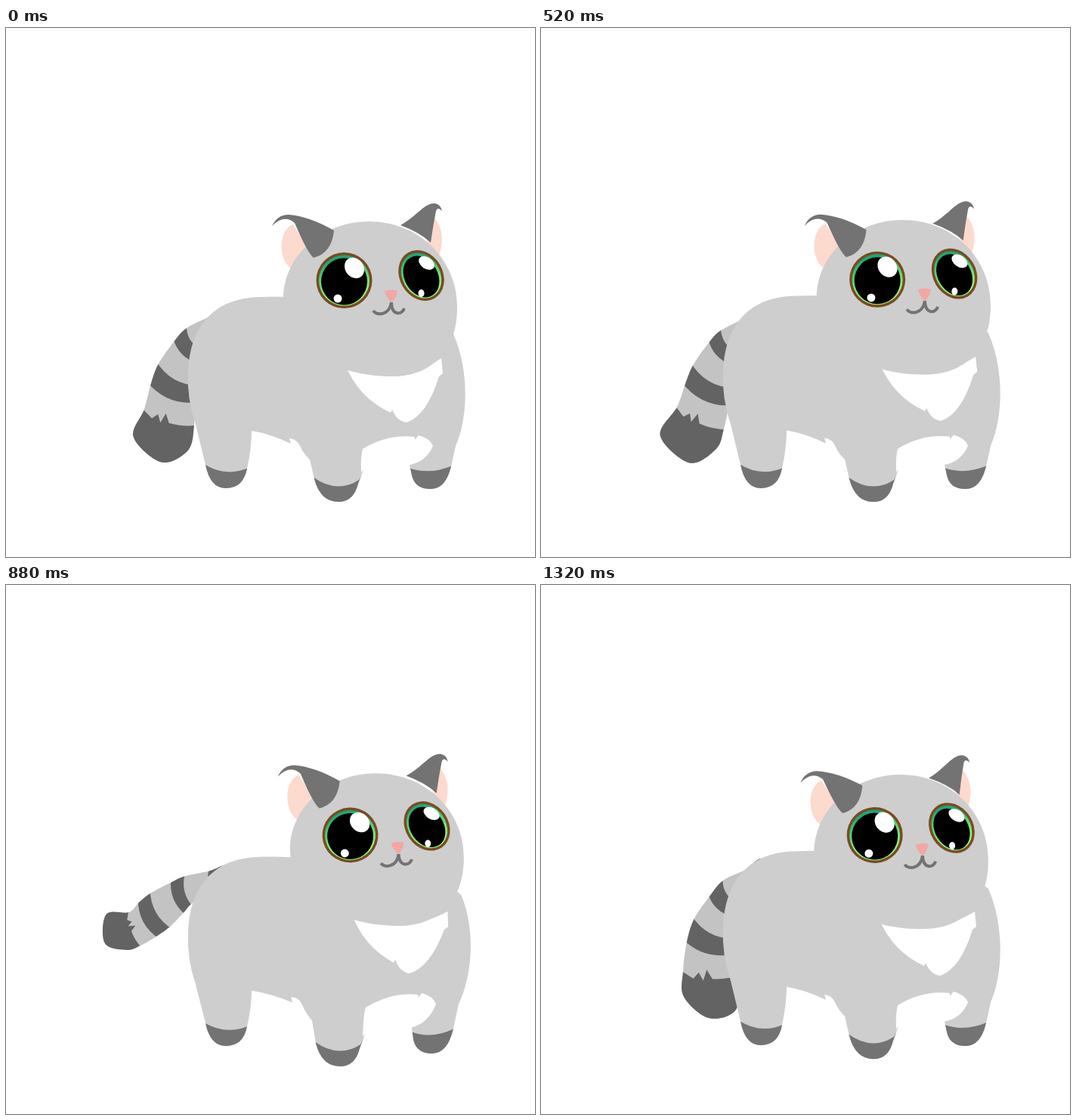
These frames come from a looping animation (700x700 px, 1360 ms). An HTML page with a canvas:

```html
<!DOCTYPE html>
<html lang="en">
<head>
<meta charset="utf-8">
<title>Cat</title>
<style>
html, body { margin: 0; width: 100%; height: 100%; overflow: hidden; background: #fff; }
canvas { display: block; }
</style>
</head>
<body>
<canvas width="700" height="700"></canvas>
<script>
const ctx = document.querySelector('canvas').getContext('2d');
const LOOP = 1360, CYCLE = 1000, STEP = 40;
const FUR = '#cecece', DARK = '#737373', TAIL_DARK = '#636363', TAIL_LIGHT = '#c3c3c3', PINK = '#fcdacd';

const body = 'M400 357Q350 354 322 357C270 363 243 400 241 455Q239 490 251 525L264 578Q270 609 291 609Q314 609 319 583Q325 555 325 533Q350 537 377 550L375 543Q385 544 389 553Q394 564 402 571L408 597Q416 627 440 627Q460 627 466 603L473 584L470 588Q469 568 472 557Q505 537 541 541L541 545L546 539Q561 543 565 553Q556 574 534 578L537 592Q541 610 562 610Q582 610 589 580L595 553C611 518 614 455 592 405L500 330Z';
const paws = 'M262 577Q291 595 321 582L321 660L262 660ZM406 594Q438 617 467 598L475 583L475 660L406 660ZM533 582Q560 592 591 579L591 660L533 660Z';
const chest = 'M449 446Q512 476 576 437L578 457L573 461Q557 513 530 522Q517 520 511 505L509 509Q467 490 449 446Z';
const head = 'M480 256C550 256 598 310 597 370C597 430 560 461 512 461C430 461 367 420 367 357C368 300 420 256 480 256Z';
const leftEar = 'M352 262Q359 247 374 247Q401 249 434 268Q431 298 407 304Q399 298 382 258Q368 246 352 262Z';
const leftPink = 'M380 260C360 266 359 310 380 320L405 300Z';
const rightEar = 'M522 261C545 248 553 232 567 232Q575 233 577 242Q571 236 569 242Q565 262 562 284Q547 270 522 261Z';
const rightPink = 'M567 252Q583 270 573 301L555 290Z';
const nose = 'M501 348Q510 345 518 348Q517 357 510 363Q503 357 501 348Z';
const mouth = 'M486 374C490 381 507 381 510 363C510 381 524 380 527 371';

// Outer x y and inner x y at seven stripe edges, then three points round the tip
const tailBack = [297,372,300,405, 269,386,278,400, 238,402,254,428, 223,416,250,446, 201,447,250,477, 190,472,248,501, 178,499,237,534, 150,538, 190,576, 225,556];
const tailLow = [292,363,300,400, 270,377,278,392, 241,391,252,415, 223,412,250,437, 203,441,250,467, 193,472,250,488, 188,511,262,515, 189,545, 222,573, 258,562];
const tailHigh = [300,371,300,405, 268,374,268,405, 235,373,238,420, 215,374,222,424, 183,373,187,432, 162,373,155,435, 146,370,118,430, 107,341, 69,382, 92,415];

// Offsets at full weight: head x y angle scale, ears x y, face x y angle, right ear angle, chest x y, breath, size
const poses = {
  sway: [-5.5, -5, -1.75, 0, -6, -4.2, -6, -4.5, -1.7, 0, -2, -5, .015, 0],
  hunch: [4.5, 11, 0, -.03, 3, 17, 4, 15.5, 0, 12, 5, 9, 0, .0065],
  stretch: [18.5, 4.5, 0, -.1, 18, 14.5, 16.5, 21.5, -6, 0, 0, 0, 0, 0],
  hop: [-1, -12, 0, .04, -2, -18, -1, -19, 0, 0, 0, -6, 0, 0]
};

// Time, weights of the four poses, tail droop
const keys = [
  [0, 0, 0, 0, 0, .48],
  [120, .5, 0, 0, 0, 1],
  [220, .85, 0, 0, 0, 1.2],
  [320, 1, 0, 0, 0, 1],
  [520, .4, 0, 0, 0, .2],
  [640, 0, 1, 0, 0, 0],
  [800, 0, 0, 1, 0, .2],
  [900, 0, 0, .4, 1, .3]
];

// Cyclic interpolation that never overshoots its keys
function sample(t) {
  const n = keys.length;
  const key = (i, c) => {
    const turn = Math.floor(i / n);
    return keys[i - turn * n][c] + (c ? 0 : turn * CYCLE);
  };
  const slope = (i, c) => (key(i + 1, c) - key(i, c)) / (key(i + 1, 0) - key(i, 0));
  const tangent = (i, c) => {
    const a = slope(i - 1, c), b = slope(i, c);
    return a * b > 0 ? 2 * a * b / (a + b) : 0;
  };
  let i = n - 1;
  while (keys[i][0] > t) i--;
  const span = key(i + 1, 0) - key(i, 0), u = (t - key(i, 0)) / span, w = 1 - u;
  return keys[0].slice(1).map((_, j) => {
    const c = j + 1;
    return key(i, c) * (1 + 2 * u) * w * w + key(i + 1, c) * (3 - 2 * u) * u * u
      + span * u * w * (tangent(i, c) * w - tangent(i + 1, c) * u);
  });
}

const mix = (a, b, k) => a.map((v, i) => v + (b[i] - v) * k);
const clamp = v => Math.min(1, Math.max(0, v));

// Pushes the front legs down and the shoulders forward
function stretched(path, k) {
  return new Path2D(path.replace(/([\d.]+) ([\d.]+)/g, (_, px, py) => {
    const x = +px, y = +py, front = clamp((x - 345) / 60);
    const leg = clamp((y - 540) / 45) ** 2, shoulder = clamp((520 - y) / 110);
    const dx = front * Math.max(4, 20 - (y - 405) * .085);
    const dy = 7 - 5 * leg + front * (22 * leg - 5 + 8 * shoulder);
    return `${x + dx * k} ${y + dy * k}`;
  }));
}

function fill(path, color) {
  ctx.fillStyle = color;
  ctx.fill(typeof path === 'string' ? new Path2D(path) : path);
}

function group(draw) {
  ctx.save();
  draw();
  ctx.restore();
}

function place(cx, cy, dx, dy, angle, scaleY = 1) {
  ctx.translate(cx + dx, cy + dy);
  ctx.rotate(angle * Math.PI / 180);
  ctx.scale(1, scaleY);
  ctx.translate(-cx, -cy);
}

function ellipse(x, y, rx, ry, angle, color) {
  const path = new Path2D();
  path.ellipse(x, y, rx, ry, angle * Math.PI / 180, 0, 7);
  fill(path, color);
}

function smoothClosed(pts) {
  const path = new Path2D(), n = pts.length, at = i => pts[(i + n) % n];
  path.moveTo(...pts[0]);
  for (let i = 0; i < n; i++) {
    const [a, b, c, d] = [at(i - 1), at(i), at(i + 1), at(i + 2)];
    path.bezierCurveTo(b[0] + (c[0] - a[0]) / 6, b[1] + (c[1] - a[1]) / 6,
      c[0] - (d[0] - b[0]) / 6, c[1] - (d[1] - b[1]) / 6, ...c);
  }
  return path;
}

function drawTail(v) {
  const pts = v.flatMap((x, i) => i % 2 ? [] : [[x, v[i + 1]]]);
  const tip = pts.splice(14);
  const outer = pts.filter((_, i) => i % 2 === 0), inner = pts.filter((_, i) => i % 2);
  // Point along stripe edge i, pushed towards the tip
  const edge = (i, along, push) => {
    const [x, y] = outer[i], dx = inner[i][0] - x, dy = inner[i][1] - y;
    return [x + dx * along - dy * push, y + dy * along + dx * push];
  };
  group(() => {
    const outline = smoothClosed([...outer, ...tip, ...[...inner].reverse()]);
    fill(outline, TAIL_LIGHT);
    ctx.clip(outline);
    for (const i of [0, 2, 4]) {
      const stripe = new Path2D();
      stripe.moveTo(...edge(i, -.1, -.03));
      stripe.quadraticCurveTo(...edge(i, .5, .3), ...edge(i, 1.1, -.03));
      stripe.lineTo(...edge(i + 1, 1.1, -.03));
      stripe.quadraticCurveTo(...edge(i + 1, .5, .3), ...edge(i + 1, -.1, -.03));
      fill(stripe, TAIL_DARK);
    }
    const end = new Path2D();
    end.moveTo(...edge(6, -.1, -.04));
    for (const [u, p] of [[.19, .12], [.28, .01], [.37, .15], [.42, -.05], [.53, .11]]) end.lineTo(...edge(6, u, p));
    end.quadraticCurveTo(...edge(6, .8, .11), ...edge(6, 1.1, -.02));
    end.lineTo(...edge(6, 1.6, 1.6));
    end.lineTo(...edge(6, -.9, 1.6));
    end.lineTo(...edge(6, -.4, .1));
    fill(end, TAIL_DARK);
  });
}

function eye(x, y, rx, ry, angle) {
  const iris = ctx.createLinearGradient(x - 8, y - ry, x + 8, y + ry);
  iris.addColorStop(.1, '#1ca577');
  iris.addColorStop(.75, '#8cff7c');
  ellipse(x, y, rx, ry, angle, '#7b4a1f');
  ellipse(x, y, rx - 3.5, ry - 3.5, angle, iris);
  ellipse(x, y + 1.5, rx - 6.5, ry - 6, angle, '#000');
}

function drawFace() {
  eye(447.5, 334, 37, 37, 0);
  ellipse(461, 317.5, 12, 14.5, -38, '#fff');
  ellipse(439, 358, 5.5, 5.5, 0, '#fff');
  eye(549.5, 327.5, 28.5, 35, -30);
  ellipse(556.5, 311, 11.5, 7.5, 35, '#fff');
  ellipse(549.5, 351, 4, 5, 0, '#fff');
  ctx.strokeStyle = DARK;
  ctx.lineWidth = 4;
  ctx.stroke(new Path2D(mouth));
  fill(nose, '#f2a7a4');
}

function draw(t) {
  const weights = sample(t), stretch = weights[2], droop = weights[4];
  const list = Object.values(poses);
  const [hx, hy, headTurn, squash, ex, ey, fx, fy, faceTurn, earTurn, cx, cy, breath, size] =
    list[0].map((_, i) => list.reduce((sum, pose, p) => sum + pose[i] * weights[p], 0));
  const ears = (left, right, color) => group(() => {
    place(482, 358, ex, ey, headTurn);
    fill(left, color);
    place(545, 280, 0, 0, earTurn);
    fill(right, color);
  });

  ctx.fillStyle = '#fff';
  ctx.fillRect(0, 0, 700, 700);
  drawTail(mix(mix(tailBack, tailLow, droop), tailHigh, stretch));
  ears(leftPink, rightPink, PINK);
  group(() => {
    ctx.scale(1 + size, 1 + size);
    place(0, 610, 0, 0, 0, 1 + breath);
    const torso = stretched(body, stretch);
    fill(torso, FUR);
    ctx.clip(torso);
    fill(stretched(paws, stretch), DARK);
  });
  group(() => {
    ctx.translate(cx + 449 + 15 * stretch, cy + 446 - 15 * stretch);
    ctx.transform(1, .125 * stretch, -.12 * stretch, 1, 0, 0);
    ctx.translate(-449, -446);
    fill(chest, '#fff');
  });
  group(() => {
    place(482, 358.5, hx, hy, headTurn, 1 + squash);
    fill(head, FUR);
  });
  ears(leftEar, rightEar, DARK);
  group(() => {
    place(498, 330.5, fx, fy, faceTurn, 1 + squash);
    drawFace();
  });
}

function tick() {
  const t = performance.now() % LOOP;
  draw(Math.floor(t / STEP) * STEP % CYCLE);
  requestAnimationFrame(tick);
}
tick();
</script>
</body>
</html>
```
